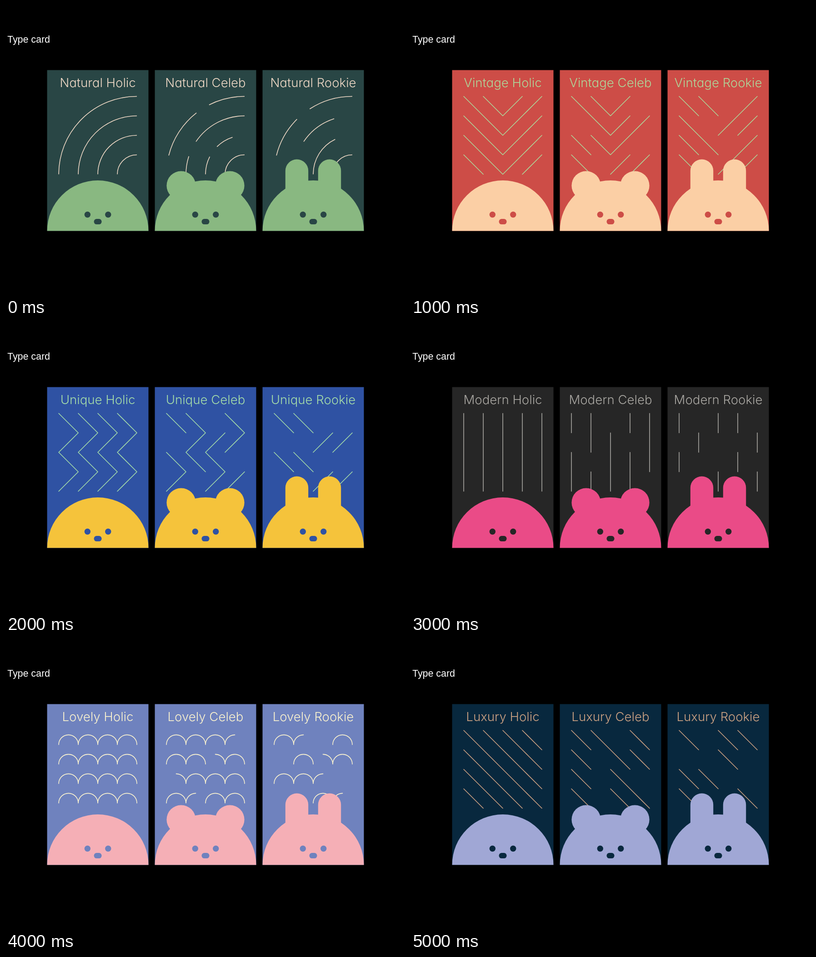
Recreate the animation shown at these times as an HTML page. Size 878 by 638 pixels, loop 6 s.

```html
<!DOCTYPE html>
<html lang="en">
<head>
<meta charset="utf-8">
<title>Type card</title>
<style>
  html, body { margin: 0; width: 100%; height: 100%; overflow: hidden; background: #000; }
  svg { display: block; width: 878px; height: 638px; }
  .label { font: 21.4px "Liberation Sans", Arial, sans-serif; fill: #fff; }
  .title { font: 300 27.6px Inter, sans-serif; font-feature-settings: "cv11"; text-anchor: middle; }
  .lines { fill: none; stroke-width: 1.6; }
  .cells { stroke-linecap: round; }
</style>
</head>
<body>
<svg viewBox="0 0 878 638">
  <text class="label" x="3" y="81">Type card</text>
  <g id="cards"></g>
</svg>
<script>
const SCENE_MS = 1000;
const KINDS = ["Holic", "Celeb", "Rookie"];
const WIDTH = 223, HEIGHT = 355, MID = WIDTH / 2;
const CELL = 43, LEFT = MID - 2 * CELL, TOP = 58;   // 4 x 4 pattern grid inside a card

const px = (x, y) => `${LEFT + x * CELL} ${TOP + y * CELL}`;
const line = (x, y, dx) => `M${px(x, y)}L${px(x + dx, y + 1)}`;
const arc = (r, from, to) => `M${from}A${r * CELL} ${r * CELL} 0 0 1 ${to}`;

// Strokes drawn once per grid cell.
const down = (i, j) => line(i, j, 1);
const up = (i, j) => line(i + 1, j, -1);
const upright = (i, j) => line(i, j, 0);
const chevron = (i, j) => (i < 2 ? down : up)(i, j);
const zigzag = (i, j) => (j % 2 ? up : down)(i, j);
const quarterBump = (i, j) => {
  const lift = i % 2 / 2, base = j + 0.73;
  return arc(0.5, px(i / 2, base - lift), px((i + 1) / 2, base - 0.5 + lift));
};

// Gaps name the columns left out of each row, one word per row.
function cells(stroke, columns) {
  return (gaps, ink) => {
    const skipped = gaps.split(" ");
    let d = "";
    for (let j = 0; j < 4; j++)
      for (let i = 0; i < columns; i++)
        if (!skipped[j]?.includes(i)) d += stroke(i, j);
    return `<path class="lines cells" stroke="${ink}" d="${d}"/>`;
  };
}

// Quarter rings around the lower right grid corner, dashed in degrees from the top.
function rings(dashes, ink) {
  const dash = dashes.split(",");
  return [4, 3, 2, 1].map((r, n) => `<path class="lines" stroke="${ink}" pathLength="90"
    stroke-dasharray="${dash[n] || "none"}"
    d="M${px(4, 4 - r)}A${r * CELL} ${r * CELL} 0 0 0 ${px(4 - r, 4)}"/>`).join("");
}

const SCENES = [
  { name: "Natural", back: "#294645", body: "#89b881", ink: "#efd9c6", draw: rings,
    celeb: "27 11 38 90, 56 16 18, 0 18 27 18 27", rookie: "33 12 31 90, 0 18 38 90, 0 26 90" },
  { name: "Vintage", back: "#cd4d47", body: "#fbcfa5", ink: "#aed79a", draw: cells(chevron, 4),
    celeb: "3 0 3 1", rookie: "2 1 2 1" },
  { name: "Unique", back: "#2f52a3", body: "#f5c33b", ink: "#a5dda9", draw: cells(zigzag, 4),
    celeb: "2 0 3 1", rookie: "23 01 23 01" },
  { name: "Modern", back: "#262626", body: "#ea4b87", ink: "#a9a7a2", draw: cells(upright, 5),
    celeb: "2 03 1 4", rookie: "14 023 124 013" },
  { name: "Lovely", back: "#6f82be", body: "#f5afb6", ink: "#fbf3cf", draw: cells(quarterBump, 8),
    celeb: "7 4 0 3", rookie: "345 014 567 01237" },
  { name: "Luxury", back: "#08283e", body: "#a0a7d5", ink: "#cda283", draw: cells(down, 4),
    celeb: "2 1 13 1", rookie: "1 013 23 12" }
];

const pair = (offset, shape) => shape(MID - offset) + shape(MID + offset);
const EARS = {
  Holic: "",
  Celeb: pair(53.6, x => `<circle cx="${x}" cy="255" r="32"/>`),
  Rookie: pair(36, x => `<rect x="${x - 25.2}" y="197" width="50.4" height="100" rx="25.2"/>`)
};
const FACE = pair(22.7, x => `<circle cx="${x}" cy="319" r="6.7"/>`) +
  `<rect x="${MID - 8.5}" y="328.6" width="17" height="12" rx="5.8"/>`;
const HEAD = `<path d="M0 ${HEIGHT}A${MID} ${MID} 0 0 1 ${WIDTH} ${HEIGHT}Z"/>`;

function card({ name, back, body, ink, draw, ...gaps }, kind, i) {
  return `<g transform="translate(${90.5 + 237 * i} 141.5)">
    <rect width="${WIDTH}" height="${HEIGHT}" fill="${back}"/>
    <text class="title" x="${MID}" y="37.2" fill="${ink}">${name} ${kind}</text>
    ${draw(gaps[kind.toLowerCase()] || "", ink)}
    <g fill="${body}">${EARS[kind]}${HEAD}</g>
    <g fill="${back}">${FACE}</g>
  </g>`;
}

const cards = document.getElementById("cards");
let shown = -1;

function frame() {
  const current = Math.floor(performance.now() / SCENE_MS) % SCENES.length;
  if (current !== shown) {
    shown = current;
    cards.innerHTML = KINDS.map((kind, i) => card(SCENES[current], kind, i)).join("");
  }
  requestAnimationFrame(frame);
}
frame();
</script>
</body>
</html>
```
